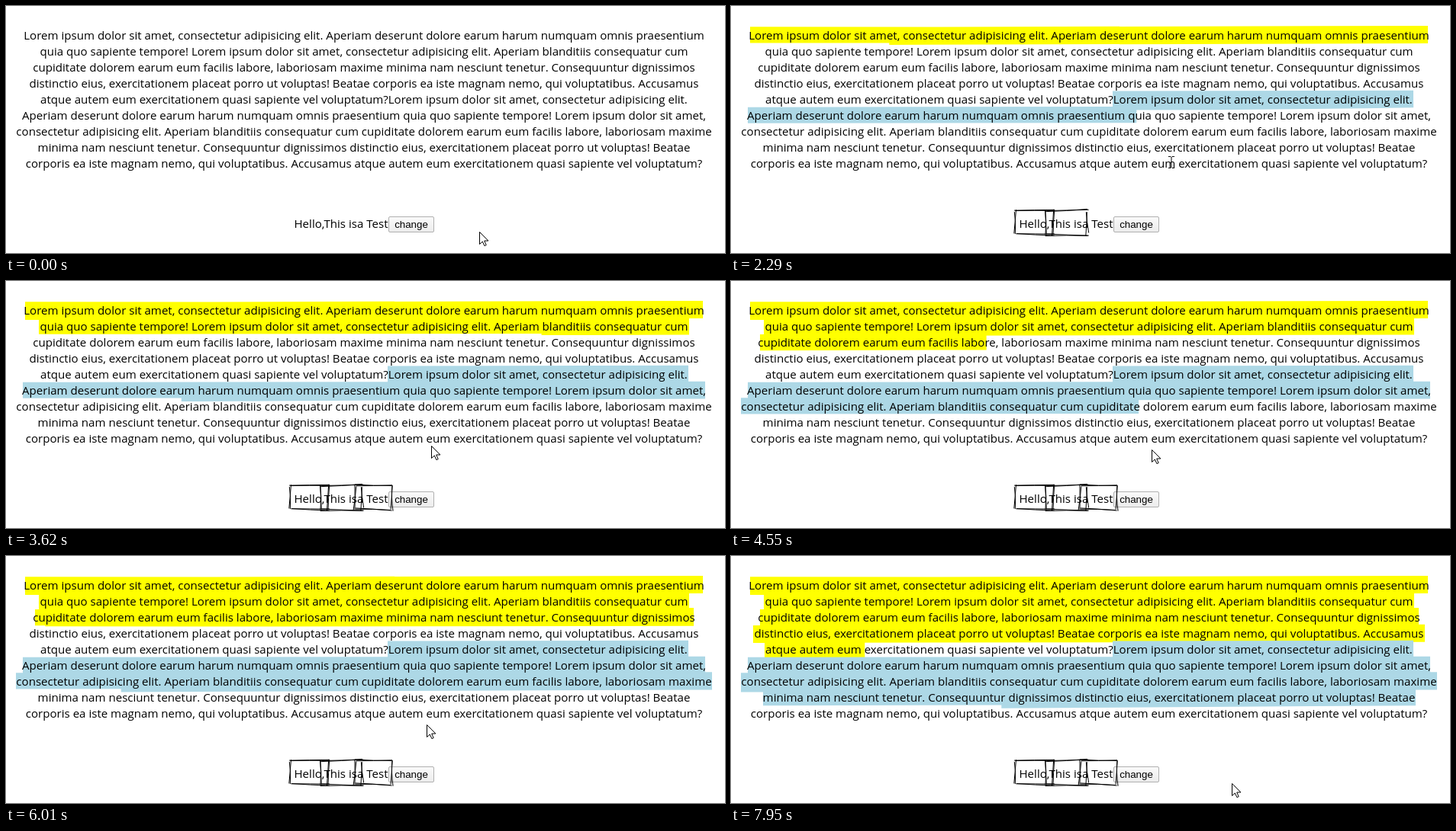
Recreate the animation shown at these times as an HTML page. Size 942 by 324 pixels, loop 8 s.

```html
<!DOCTYPE html>
<html lang="en">
<head>
<meta charset="utf-8">
<title>Highlighted text</title>
<style>
  html, body { margin: 0; width: 100%; height: 100%; overflow: hidden; background: #fff; }
  svg { display: block; width: 942px; height: 324px; }
  text { font: 15.08px "Open Sans", "Noto Sans", sans-serif; fill: #000; }
  .paragraph { text-anchor: middle; }
  .label { font: 13.33px "Liberation Sans", Arial, sans-serif; text-anchor: middle; }
  .marks path { fill: none; }
</style>
</head>
<body>
<svg viewBox="0 0 942 324">
  <defs>
    <linearGradient id="face" x2="0" y2="1">
      <stop offset="0" stop-color="#fafafa"/>
      <stop offset="1" stop-color="#ececec"/>
    </linearGradient>
  </defs>
  <g class="marks" id="highlights"></g>
  <g id="copy"></g>
  <text x="377.5" y="291">Hello,This isa Test</text>
  <rect x="501.5" y="276.5" width="59" height="20" rx="1.5" fill="url(#face)" stroke="#b0b0b0"/>
  <text class="label" x="531" y="291">change</text>
  <g class="marks" id="boxes"></g>
  <path id="arrow" d="M.5 .5V16.5L4.3 13L6.9 18.6L9.2 17.6L6.7 12H11.9Z" fill="#fff" stroke="#000"/>
  <path id="beam" d="M-4 -7.5H-1L0 -6.5L1 -7.5H4M0 -6.5V6.5M-4 7.5H-1L0 6.5L1 7.5H4" fill="none" stroke="#000"/>
</svg>
<script>
const LOOP = 8000, START = 851, LINE = 21, FIRST_MIDDLE = 38.3;
const lines = [
  'Lorem ipsum dolor sit amet, consectetur adipisicing elit. Aperiam deserunt dolore earum harum numquam omnis praesentium',
  'quia quo sapiente tempore! Lorem ipsum dolor sit amet, consectetur adipisicing elit. Aperiam blanditiis consequatur cum',
  'cupiditate dolorem earum eum facilis labore, laboriosam maxime minima nam nesciunt tenetur. Consequuntur dignissimos',
  'distinctio eius, exercitationem placeat porro ut voluptas! Beatae corporis ea iste magnam nemo, qui voluptatibus. Accusamus',
  'atque autem eum exercitationem quasi sapiente vel voluptatum?Lorem ipsum dolor sit amet, consectetur adipisicing elit.',
  'Aperiam deserunt dolore earum harum numquam omnis praesentium quia quo sapiente tempore! Lorem ipsum dolor sit amet,',
  'consectetur adipisicing elit. Aperiam blanditiis consequatur cum cupiditate dolorem earum eum facilis labore, laboriosam maxime',
  'minima nam nesciunt tenetur. Consequuntur dignissimos distinctio eius, exercitationem placeat porro ut voluptas! Beatae',
  'corporis ea iste magnam nemo, qui voluptatibus. Accusamus atque autem eum exercitationem quasi sapiente vel voluptatum?'
];
const byId = id => document.getElementById(id);
const strokes = [];

let seed = 7;
function jitter(size) {
  seed = (seed * 16807) % 2147483647;
  return (seed / 2147483647 * 2 - 1) * size;
}

function add(parent, name, attributes) {
  const node = document.createElementNS('http://www.w3.org/2000/svg', name);
  for (const key in attributes) node.setAttribute(key, attributes[key]);
  return byId(parent).appendChild(node);
}

function addStroke(parent, d, color, width, begin, duration) {
  const node = add(parent, 'path', { d, stroke: color, 'stroke-width': width, pathLength: 1 });
  strokes.push({ node, begin, duration });
}

// Each line is marked rightwards, then leftwards a little lower.
function highlight(color, firstLine, spans, msPerPixel, drop) {
  let time = START;
  spans.forEach(([left, right], i) => {
    const y = FIRST_MIDDLE + (firstLine + i) * LINE;
    const mid = (left + right) / 2;
    const duration = (right - left) * msPerPixel;
    const there = `M${left} ${y + jitter(.5)}Q${mid} ${y - .5 + jitter(1)} ${right} ${y - 1.5 + jitter(.7)}`;
    const back = `M${right} ${y + .5 + jitter(.6)}Q${mid} ${y + drop + jitter(.5)} ${left} ${y + drop + jitter(.7)}`;
    for (const d of [there, back]) {
      addStroke('highlights', d, color, 21.2, time, duration);
      time += duration;
    }
  });
}

function sketchBox(left, right, begin) {
  const top = 268.5, bottom = 299.5;
  const corners = [[left, top], [right, top], [right, bottom], [left, bottom]];
  const perimeter = 2 * (right - left + bottom - top);
  let time = begin;
  for (let side = 0; side < 8; side++) {
    const [x1, y1] = corners[side % 4], [x2, y2] = corners[(side + 1) % 4];
    const duration = 320 * Math.hypot(x2 - x1, y2 - y1) / perimeter;
    const near = (a, size = 2.2) => (a + jitter(size)).toFixed(1);
    const d = `M${near(x1)} ${near(y1)}Q${near((x1 + x2) / 2, 1)} ${near((y1 + y2) / 2, 1)} ${near(x2)} ${near(y2)}`;
    addStroke('boxes', d, '#000', 1, time, duration);
    time += duration;
  }
}

lines.forEach((line, i) => {
  add('copy', 'text', { class: 'paragraph', x: 469, y: 44 + i * LINE }).textContent = line;
});
highlight('#ff0', 0, [[25, 913], [43, 895], [38, 901], [29, 909], [44, 501]], 1.007, 2);
highlight('lightblue', 4, [[500, 894], [22, 916], [13, 925], [42, 897], [25, 913]], 1.258, 4);
[[373, 422], [413, 467], [457, 505]].forEach(([left, right], i) => sketchBox(left, right, START + i * 800));

// CSS ease-out: cubic-bezier(0, 0, .58, 1)
function easeOut(x) {
  if (x <= 0) return 0;
  if (x >= 1) return 1;
  let low = 0, high = 1;
  for (let i = 0; i < 20; i++) {
    const s = (low + high) / 2;
    if (1.74 * s * s * (1 - s) + s ** 3 < x) low = s; else high = s;
  }
  return low * low * (3 - 2 * low);
}

// time, x, y
const pointer = [
  [0, 620, 296], [70, 620, 296], [400, 545, 288], [880, 540, 286], [980, 487, 236],
  [1050, 454, 213], [1450, 456, 214], [1720, 512, 244], [2150, 577, 205], [2700, 577, 205],
  [3400, 557, 216], [3700, 557, 216], [4310, 551, 221], [6050, 551, 221],
  [6500, 598, 270], [6800, 600, 280], [7640, 600, 280], [7880, 656, 298], [8000, 656, 298]
];
function pointerAt(time) {
  const i = pointer.findIndex(key => key[0] > time);
  const [t1, x1, y1] = pointer[i - 1], [t2, x2, y2] = pointer[i];
  const p = (time - t1) / (t2 - t1);
  const e = p * p * (3 - 2 * p);
  return [Math.round(x1 + (x2 - x1) * e), Math.round(y1 + (y2 - y1) * e)];
}

function draw(time) {
  for (const { node, begin, duration } of strokes) {
    const progress = easeOut((time - begin) / duration);
    node.style.display = progress ? '' : 'none';
    node.setAttribute('stroke-dasharray', progress < 1 ? `${progress} 2` : 'none');
  }
  const [x, y] = pointerAt(time);
  const overText = y < 216;
  byId('arrow').style.display = overText ? 'none' : '';
  byId('beam').style.display = overText ? '' : 'none';
  byId(overText ? 'beam' : 'arrow').setAttribute('transform', `translate(${x} ${y})`);
}

const origin = performance.now();
function tick() {
  draw((performance.now() - origin) % LOOP);
  requestAnimationFrame(tick);
}
tick();
</script>
</body>
</html>
```
